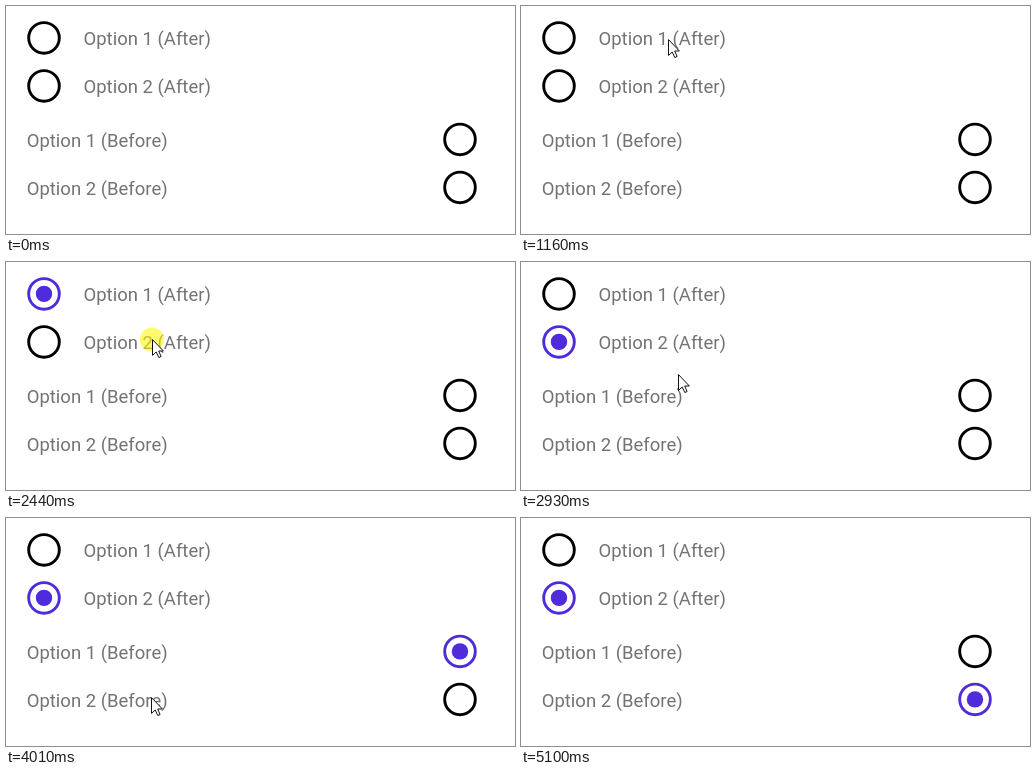
These frames come from a looping animation (509 by 228 pixels, 5.83 s). An HTML page:

```html
<!DOCTYPE html>
<html lang="en">
<head>
<meta charset="utf-8">
<title>Radio buttons</title>
<style>
  html, body { margin: 0; width: 100%; height: 100%; overflow: hidden; background: #fff; }
  svg { display: block; width: 509px; height: 228px; }
  text { font: 18.5px Roboto, sans-serif; fill: #737373; }
</style>
</head>
<body>
<svg id="stage" viewBox="0 0 509 228">
  <g id="rows"></g>
  <circle id="press" r="12" fill="#fff600" fill-opacity=".56"/>
  <path id="cursor" d="M.5 .6V16.4L4.2 13 6.8 18.5 9.1 17.5 6.7 12H11.4Z"
        fill="#fff" stroke="#111" stroke-width="1"/>
</svg>
<script>
const LOOP = 5830, SHOW = 260, HIDE = 5100, STEP = 67;
const RING = 15.3, LINE = 2.9, DOT = 8.2;
const ON = '#4f2bdc', OFF = '#000';
const DELAY = 20, FILL = 85, SETTLE = 333, PRESS = 120;
const clicks = [1490, 2440, 3540, 4480];

// Each move bends from the last stop past a via point to its own stop
const entry = [388, 172];
const moves = [
  { from: 260, to: 820, via: [224, 23], stop: [147, 33] },
  { from: 930, to: 1130, via: [147, 55], stop: [147, 33] },
  { from: 1650, to: 2080, via: [147, 55], stop: [146, 77] },
  { from: 2600, to: 3210, via: [166, 118], stop: [150, 135] },
  { from: 3700, to: 4220, via: [143, 188], stop: [145, 187] },
  { from: 4650, to: 5016, via: [146, 190], stop: [171, 205] }
];

const byId = id => document.getElementById(id);
const clamp = v => Math.min(1, Math.max(0, v));
const mix = (a, b, p) => a + (b - a) * p;
const bend = (a, b, c, p) => mix(mix(a, b, p), mix(b, c, p), p);
const easeOut = p => 1 - (1 - p) ** 3;

function set(el, attrs) {
  for (const key in attrs) el.setAttribute(key, attrs[key]);
}

function add(parent, tag, attrs) {
  const el = document.createElementNS('http://www.w3.org/2000/svg', tag);
  set(el, attrs);
  return parent.appendChild(el);
}

// Two rows with the label after the button, two with it before
function makeRadio(on, i) {
  const before = i > 1, first = i % 2 === 0, rows = byId('rows');
  const y = 31.9 + 48 * i + (before ? 5.5 : 0);
  const center = { cx: before ? 454 : 38, cy: y };
  const label = add(rows, 'text', { x: before ? 20.7 : 77.5, y: Math.round(y + 7.2) });
  label.textContent = `Option ${first ? 1 : 2} (${before ? 'Before' : 'After'})`;
  return {
    on,
    off: first ? clicks[i + 1] : Infinity,
    ring: add(rows, 'circle', { ...center, fill: 'none' }),
    dot: add(rows, 'circle', center)
  };
}

// Hold each step, counted from the last click
function snap(t) {
  const start = [0, SHOW, ...clicks].filter(c => c <= t).pop();
  return start + Math.floor((t - start) / STEP) * STEP;
}

function tipAt(t) {
  let tip = entry;
  for (const { from, to, via, stop } of moves) {
    if (t < from) break;
    const p = clamp((t - from) / (to - from));
    tip = tip.map((v, axis) => bend(v, via[axis], stop[axis], p));
  }
  return tip;
}

// Ring scale, ring line, dot scale
function pose(checked, age) {
  const fill = clamp(age / FILL);
  const rest = easeOut(clamp((age - FILL) / SETTLE));
  if (checked) {
    return fill < 1
      ? [mix(1, .5, fill), mix(LINE, 2 * RING, fill), 0]
      : [mix(.9, 1, rest), LINE, rest];
  }
  return fill < 1
    ? [mix(1, .9, fill), LINE, mix(1, 1.4, fill)]
    : [mix(.5, 1, rest), mix(2 * RING, LINE, rest), 0];
}

function drawRadio(r, t) {
  const on = t - r.on - DELAY, off = t - r.off - DELAY;
  const checked = on >= 0 && off < 0;
  const [scale, line, dot] = on < 0 ? [1, LINE, 0] : pose(checked, checked ? on : off);
  const color = checked ? ON : OFF;
  set(r.ring, { r: RING * scale, 'stroke-width': line * scale, stroke: color });
  set(r.dot, { r: DOT * dot, fill: color });
}

function draw(time) {
  const t = snap(time);
  const [x, y] = tipAt(t).map(Math.round);
  const pressed = clicks.some(c => t >= c && t < c + PRESS);
  radios.forEach(r => drawRadio(r, t));
  set(byId('cursor'), {
    transform: `translate(${x} ${y})`,
    visibility: time >= SHOW && time < HIDE ? 'visible' : 'hidden'
  });
  set(byId('press'), { cx: x, cy: y + .6, visibility: pressed ? 'visible' : 'hidden' });
}

const radios = clicks.map(makeRadio);
const begin = performance.now();
function tick() {
  draw((performance.now() - begin) % LOOP);
  requestAnimationFrame(tick);
}
tick();
</script>
</body>
</html>
```
